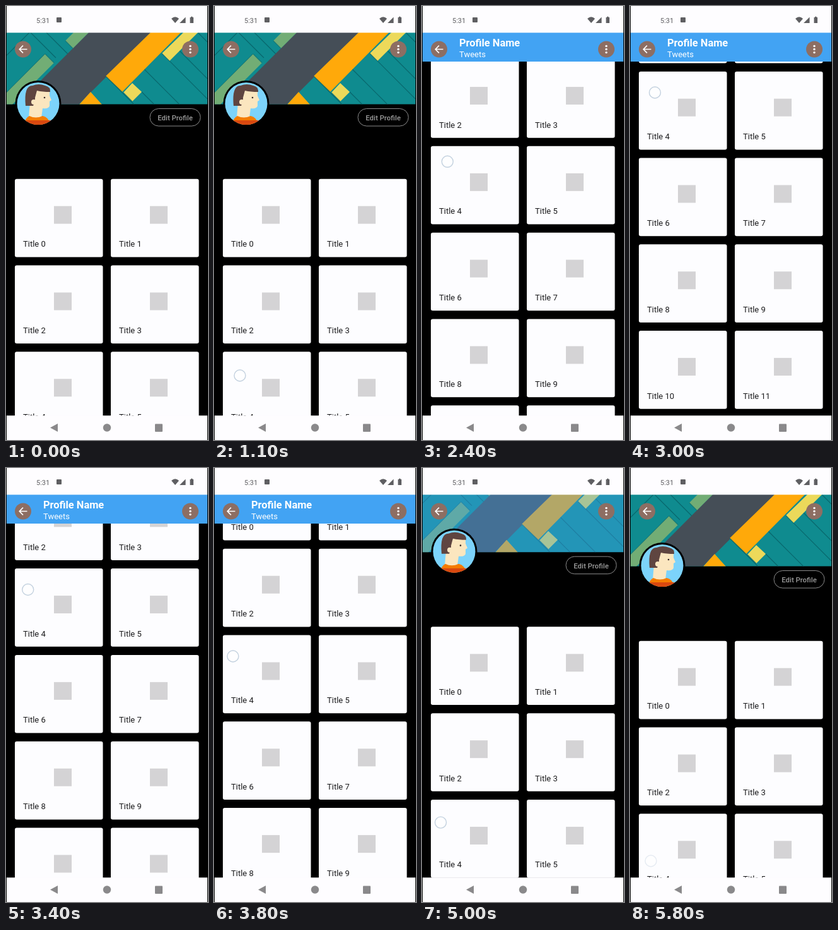
These frames come from a looping animation (320 px wide and 687 px high, 6.3 s). An HTML page:

```html
<!DOCTYPE html>
<html lang="en">
<head>
<meta charset="utf-8">
<title>Collapsing profile</title>
<style>
  html, body { margin: 0; width: 100%; height: 100%; overflow: hidden; background: #000; }
  svg { display: block; width: 100%; height: 100%; font-family: Roboto, sans-serif; }
  .teal { fill: #0f8b8f; }
  .green { fill: #72ad75; }
  .orange { fill: #ffa90a; }
  .yellow { fill: #ecd95a; }
  .seams { fill: none; stroke: #08666c; stroke-width: 1.2; }
  .card { fill: #fdfdff; }
  .card-title { fill: #1c1c1e; font-size: 13px; }
  .bar { fill: #fefdff; }
  .nav { fill: #8a898b; }
  .status { fill: #5f5f62; }
  .icon { fill: none; stroke: #fff; stroke-width: 1.7; }
</style>
</head>
<body>
<svg viewBox="0 0 320 687">
  <defs>
    <clipPath id="headerClip"><rect id="headerArea" x="1" y="42" width="318" height="113.5"/></clipPath>
    <clipPath id="avatarClip"><circle cx="51" cy="154.5" r="33.5"/></clipPath>
  </defs>
  <rect width="320" height="687"/>

  <g id="page">
    <g id="cards"></g>
    <rect x="228" y="162.5" width="80" height="27.5" rx="13.7" fill="#000" stroke="#8b8b8b"/>
    <text x="268" y="181" text-anchor="middle" font-size="11.4" font-weight="500" fill="#9b9b9b">Edit Profile</text>
  </g>

  <g id="avatarBelow"></g>

  <g clip-path="url(#headerClip)">
    <g id="banner">
      <rect class="teal" x="1" y="42" width="318" height="114"/>
      <path class="seams" d="M39 42l40 40M64 42l42 42M37 42L1 78M62 76L1 137M158 111l45 45M219 100l56 56M215 136l20 20M247 75l72 72M275 71l44 44M304 42l15 15"/>
      <path fill="#454e57" d="M131 42h98L115 156H17z"/>
      <path class="green" d="M107 42h24l-25 25-12-12zM62 76l14 14-66 66H1v-19z"/>
      <path class="orange" d="M229 42h48l-93 94-26-25zM116 156l18-20 18 20z"/>
      <path class="yellow" d="M200 122l15 14-15 15-14-14zM281 42h23l-45 45-12-12z"/>
      <path class="seams" d="M94 55l12 12M62 76l14 14M158 111l26 25M186 137l14 14M247 75l12 12" opacity=".6"/>
    </g>
    <rect id="scrim" x="1" y="42" width="318" height="114" fill="#42a3f3"/>
    <g id="heading" fill="#fff">
      <text x="59" y="64" font-size="16.4" font-weight="700">Profile Name</text>
      <text x="59" y="81" font-size="13">Tweets</text>
    </g>
  </g>

  <g id="avatarAbove">
    <g id="avatar">
      <circle cx="51" cy="154.5" r="36.5"/>
      <g clip-path="url(#avatarClip)">
        <rect x="16" y="120" width="70" height="70" fill="#7cd3fb"/>
        <path fill="#fbe6bf" d="M41 132H69V142L72 149L69 151V158Q68 163 58 162L56 177H36L38 153z"/>
        <path fill="#5f4540" d="M31 158Q28 126 42 126Q52 122 62 126Q71 128 70 136Q58 136 49 134L46 145V151L43 158z"/>
        <circle cx="44" cy="152" r="4" fill="#fbe6bf"/>
        <circle cx="61" cy="145" r="1.3" fill="#3b2c2a"/>
        <path fill="#f57c00" d="M28 190Q30 177 37 174Q47 179 58 174Q68 176 72 190z"/>
        <path fill="#d9480f" d="M30 181h41l4 9H27z"/>
      </g>
    </g>
  </g>

  <g fill="#8d6e63"><circle cx="27" cy="68.5" r="13"/><circle cx="292" cy="68.5" r="13"/></g>
  <path class="icon" d="M33.5 68.5H22M27 62.7L21.3 68.5L27 74.3"/>
  <g fill="#fff"><circle cx="292" cy="63.4" r="1.7"/><circle cx="292" cy="68.5" r="1.7"/><circle cx="292" cy="73.6" r="1.7"/></g>

  <rect class="bar" x="1" width="318" height="42.3"/>
  <g class="status">
    <text x="48" y="26.5" font-size="11">5:31</text>
    <rect x="80" y="18" width="8" height="8" rx="1"/>
    <path d="M262 20Q268 14.5 274 20L268 27zM284.500 17.500V27H275z"/>
    <path d="M291.500 18h1.500v-1.200h2.500V18H297v9h-5.500z"/>
  </g>
  <rect class="bar" x="1" y="648.3" width="318" height="39"/>
  <g class="nav">
    <path d="M70 667.500L82 661V674z"/>
    <circle cx="160" cy="667.5" r="6.200"/>
    <rect x="236" y="661.500" width="12" height="12.500" rx="1"/>
  </g>

  <circle id="touch" r="9" fill="#fff" fill-opacity=".35" stroke="#c3d1df" stroke-width="1.400"/>
</svg>
<script>
const $ = id => document.getElementById(id);
const LOOP = 6300, STEP = 100, COLLAPSE = 67.5, ROW = 136.8;

// Finger position, scroll offset and vertical speed (px per ms) over time.
const drag = [
  { t: 1200, x: 41, y: 585, scroll: 0, v: 0 },
  { t: 1900, x: 41, y: 408, scroll: 157, v: -0.3 },
  { t: 3000, x: 39.5, y: 137, scroll: 443.6, v: 0 },
  { t: 3800, x: 30, y: 298, scroll: 282.8, v: 0.25 },
  { t: 4400, x: 27, y: 444, scroll: 141, v: 0.24 },
  { t: 5800, x: 33, y: 622, scroll: -41, v: 0 }
];

const clamp = (n, lo, hi) => Math.min(hi, Math.max(lo, n));
const ramp = (t, from, to) => clamp((t - from) / (to - from), 0, 1);

function hermite(p, q, u, pv, qv, span) {
  const s = u * u * (3 - 2 * u);
  return p + (q - p) * s + span * u * (1 - u) * (pv * (1 - u) - qv * u);
}

function sample(t) {
  const i = Math.max(0, drag.findLastIndex(k => k.t <= t));
  const a = drag[i], b = drag[i + 1] || a;
  const span = b.t - a.t, u = span ? clamp((t - a.t) / span, 0, 1) : 0;
  return {
    x: a.x + (b.x - a.x) * u,
    y: hermite(a.y, b.y, u, a.v, b.v, span),
    scroll: Math.max(0, hermite(a.scroll, b.scroll, u, -a.v, -b.v, span))
  };
}

function card(i) {
  const x = 14 + (i % 2) * 152, y = 273.7 + Math.floor(i / 2) * ROW;
  return `<g transform="translate(${x} ${y})">
    <rect class="card" width="139.5" height="123.7" rx="3"/>
    <rect x="62" y="43" width="28" height="28" fill="#d4d3d5"/>
    <text class="card-title" x="13" y="107.5">Title ${i}</text></g>`;
}
$('cards').innerHTML = Array.from({ length: 14 }, (_, i) => card(i)).join('');

function draw(now) {
  const t = Math.floor((now % LOOP) / STEP) * STEP;
  const { x, y, scroll } = sample(t);
  const fold = Math.min(scroll, COLLAPSE);
  const shift = `translate(0 ${-scroll})`;

  $('page').setAttribute('transform', shift);
  $('avatar').setAttribute('transform', shift);
  const layer = $(scroll < COLLAPSE ? 'avatarAbove' : 'avatarBelow');
  if ($('avatar').parentNode !== layer) layer.append($('avatar'));

  $('headerArea').setAttribute('height', 113.5 - fold);
  $('banner').setAttribute('transform', `translate(0 ${-fold})`);
  const shown = ramp(t, 1500, 2100);
  $('scrim').setAttribute('opacity', shown * (1 - ramp(t, 4700, 5200)));
  $('heading').setAttribute('opacity', shown * (1 - ramp(t, 4500, 4800)));

  $('touch').setAttribute('transform', `translate(${x} ${y})`);
  $('touch').setAttribute('opacity', t < 1100 ? 0 : 1 - 0.6 * ramp(t, 5500, 5800));
}

const start = performance.now();
function tick() {
  draw(performance.now() - start);
  requestAnimationFrame(tick);
}
tick();
</script>
</body>
</html>
```
